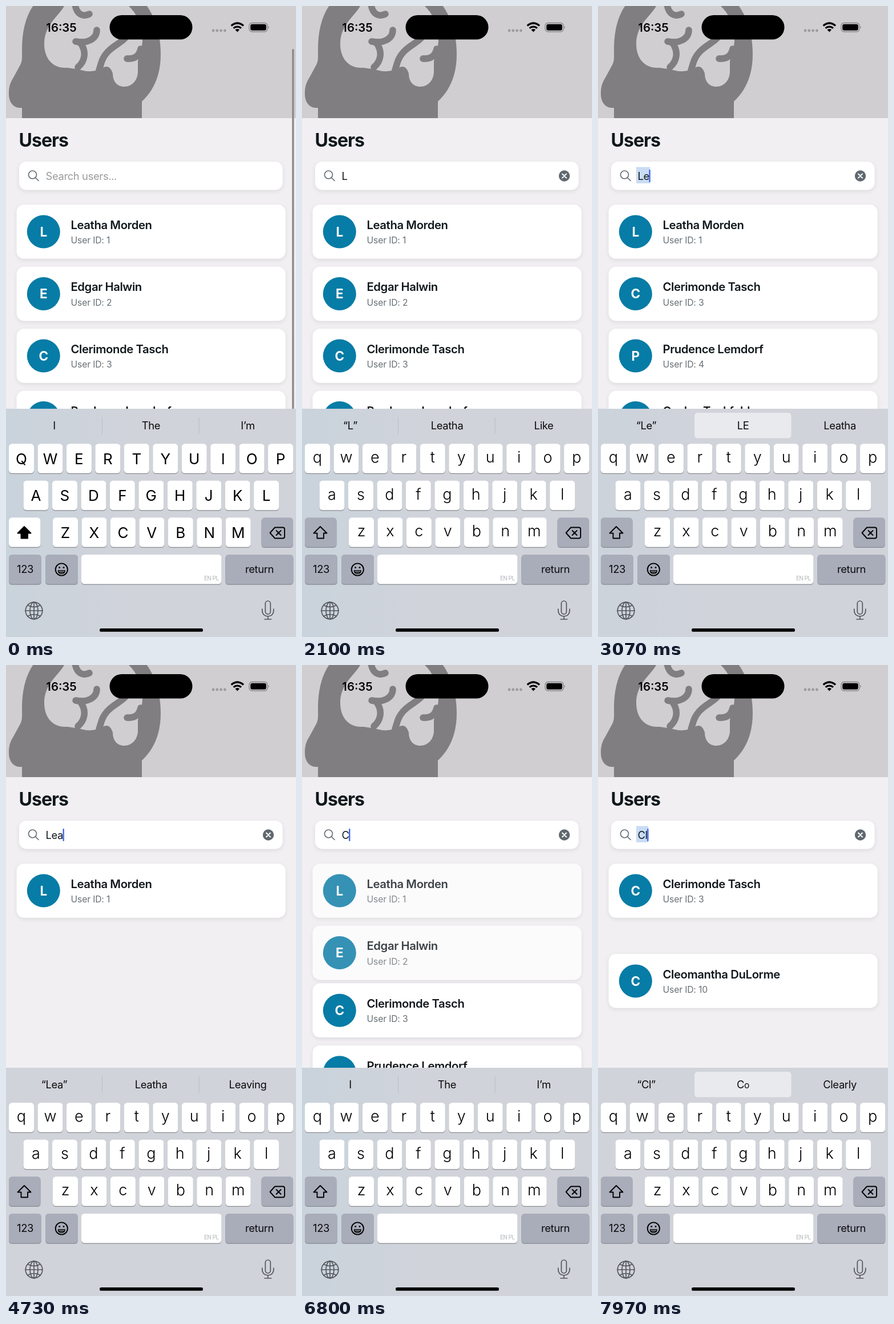
Animation, 508 px wide and 1103 px high, one loop 8 s. Source, as an HTML page:

```html
<!DOCTYPE html>
<html lang="en">
<head>
<meta charset="utf-8">
<title>User search</title>
<style>
  html, body { margin: 0; width: 100%; height: 100%; overflow: hidden; background: #f1eff2; }
  svg { display: block; width: 100vw; height: 100vh; font-family: Inter, "Liberation Sans", sans-serif; fill: #11181c; }
  .name { font-size: 20.3px; font-weight: 600; letter-spacing: -.02em; }
  .meta { font-size: 15.7px; letter-spacing: -.01em; fill: #687076; }
  .initial { font-size: 22.5px; font-weight: 700; fill: #fff; }
  .input { font-size: 18.4px; letter-spacing: -.02em; }
  .mid { text-anchor: middle; }
  .label { font-size: 18.4px; letter-spacing: -.02em; fill: #0b0b0d; }
  .upper { font-size: 26px; fill: #000; }
  .lower { font-size: 27px; font-weight: 300; fill: #000; }
  .line { fill: none; stroke-linecap: round; stroke-linejoin: round; }
</style>
</head>
<body>
<svg viewBox="0 0 508 1103" preserveAspectRatio="none">
  <defs>
    <filter id="soft" x="-5%" y="-20%" width="110%" height="150%">
      <feDropShadow dx="0" dy="2.5" stdDeviation="3.5" flood-color="#000" flood-opacity=".09"/>
    </filter>
    <linearGradient id="glow" x1="0" x2="1">
      <stop offset="0" stop-color="#c9d3dc"/>
      <stop offset=".45" stop-color="#c9d3dc" stop-opacity="0"/>
    </linearGradient>
    <clipPath id="banner"><rect width="508" height="196"/></clipPath>
  </defs>

  <rect width="508" height="1103" fill="#f1eff2"/>
  <g clip-path="url(#banner)">
    <rect width="508" height="196" fill="#d0ced1"/>
    <path fill="#807e81" d="M28 200V178C14 179 5 170 5 153C5 140 8 133 13 125L25 103C29 96 28 88 28 78C28 44 34 18 50-4H244C262 20 271 50 271 84C271 120 260 146 238 167V200Z"/>
    <path fill="#d0ced1" d="M103-3C98 14 67 30 67 66C67 92 82 108 103 108C114 108 118 110 128 111C142 116 158 115 170 108C178 103 184 108 187 118C187 132 195 141 207 141C222 141 231 128 231 115V96C234 84 240 70 239 54C238 30 228 12 212-3Z"/>
    <path class="line" stroke="#807e81" stroke-width="11.5" d="M122 62C142 66 159 58 159 42M130 64C142 80 138 97 126 107M121-2C124 14 134 20 146 14M216 42C212 66 180 66 168 96C166 102 165 106 163 112M212 92C225 93 233 88 236 75"/>
  </g>

  <text x="22.500" y="245.500" font-size="32" font-weight="700" letter-spacing="-.03em">Users</text>
  <rect x="23" y="272" width="461.5" height="49.5" rx="13" fill="#fff" filter="url(#soft)"/>
  <g class="line" stroke="#687076" stroke-width="1.7"><circle cx="46.5" cy="295" r="7"/><path d="M51.7 300.2L57 305.5"/></g>
  <rect id="selection" x="67" y="281.5" height="28.5" fill="#c9dcf3"/>
  <text id="placeholder" class="input" x="69.5" y="303.5" fill="#9b9b9e">Search users...</text>
  <text id="typed" class="input" x="69.5" y="303.5"></text>
  <rect id="caret" y="286" width="2.3" height="22" rx="1" fill="#3a63ea"/>
  <g id="clear"><circle cx="459.5" cy="297" r="9.7" fill="#606870"/><path class="line" stroke="#fff" stroke-width="1.9" d="M456 293.5l7 7m0-7l-7 7"/></g>

  <g id="list"></g>
  <rect id="scrollbar" x="501" y="75" width="3.6" height="640" rx="1.8" fill="#8f8e91"/>

  <rect y="704" width="508" height="399" fill="#d1d3da"/>
  <rect id="tint" y="704" width="508" height="399" fill="url(#glow)"/>
  <path id="dividers" stroke="#b9bcc4" d="M168.5 719V748M338 719V748"/>
  <rect id="choice" x="169" y="711" width="169.5" height="44.5" rx="5.5" fill="#e8eaee"/>
  <g id="words"></g>
  <g id="keys"></g>

  <path id="shift" class="line" stroke="#000" stroke-width="1.9" d="M32 910L43.5 921.5H38V930.5H26.5V921.5H20.5Z"/>
  <path class="line" stroke="#000" stroke-width="1.9" d="M471 911.5H485Q488 911.5 488 914.5V927.5Q488 930.5 485 930.5H471L462.5 921Z M473.5 917l8 8m0-8l-8 8"/>
  <g class="line" stroke="#000">
    <circle cx="97.3" cy="985" r="10.6" stroke-width="1.9"/>
    <path stroke-width="1.4" d="M91.3 987H103.3C102.5 994 92 994 91.3 987ZM92.5 989.700H102"/>
  </g>
  <circle cx="93.6" cy="981.5" r="1.6"/><circle cx="101" cy="981.5" r="1.6"/>
  <text class="label mid" x="33.5" y="991">123</text>
  <text class="label mid" x="444" y="991">return</text>
  <text x="347" y="1004" font-size="10.5" letter-spacing="-.05em" fill="#b7bac0" font-family="Roboto, sans-serif">EN PL</text>

  <g class="line" stroke="#55585d" stroke-width="1.7">
    <circle cx="49" cy="1057" r="14.8"/><ellipse cx="49" cy="1057" rx="7" ry="14.8"/>
    <path d="M49 1042V1072M34 1057H64M38 1047.5Q49 1053.5 60 1047.5M38 1066.5Q49 1060.5 60 1066.5"/>
    <rect x="454.3" y="1040" width="9" height="23" rx="4.5"/>
    <path d="M448.800 1054V1057C448.800 1070 468.800 1070 468.800 1057V1054M458.800 1067V1072M453 1072H464.600"/>
  </g>
  <rect x="164" y="1088" width="181" height="5.8" rx="2.9" fill="#000"/>

  <g fill="#000">
    <text class="mid" x="97" y="45.3" font-size="20.3" font-weight="600">16:35</text>
    <rect x="181.5" y="16" width="145" height="42.5" rx="21.2"/>
    <g fill="#9d9b9e"><circle cx="363" cy="43" r="2.4"/><circle cx="369.8" cy="43" r="2.4"/><circle cx="376.6" cy="43" r="2.4"/><circle cx="383.4" cy="43" r="2.4"/></g>
    <path d="M405.3 45.5L401.5 41.5Q405.3 38.5 409.1 41.5Z"/>
    <path fill="none" stroke="#000" stroke-width="3.2" d="M398.6 38.8Q405.3 33.3 412 38.8M394.6 34.5Q405.3 25.5 416 34.5"/>
    <rect x="426" y="29.5" width="32" height="15.5" rx="5" fill="none" stroke="#858386" stroke-width="1.3"/>
    <rect x="428.2" y="31.7" width="27.6" height="11.1" rx="3.2"/>
    <path fill="#858386" d="M459.6 35Q462 37.2 459.6 39.8Z"/>
  </g>
</svg>
<script>
const LOOP = 8000, PITCH = 108.5;
const people = ["Leatha Morden", "Edgar Halwin", "Clerimonde Tasch", "Prudence Lemdorf", "Candice Holbrunn",
  "Mrs. Sylvia Pechmann", "Kolman Tarrfeld", "Nathaniel Brucksdotter", "Gaylen Tuckfold", "Cleomantha DuLorme"];
const everyone = people.map((_, i) => i);
const matches = text => everyone.filter(i => people[i].toLowerCase().includes(text.toLowerCase()));

// at: keystroke time; wordsAfter: delay until new suggestions; lag: extra delay of the middle one
const step = (at, text, words, { choice = false, wordsAfter = 260, lag = 0 } = {}) => ({
  at, text, words, choice, lag, wordsAt: at + wordsAfter, listAt: at + 110,
  shown: text === "L" ? everyone : matches(text)
});
const idleWords = ["I", "The", "I’m"];
const steps = [
  step(-965, "", idleWords),
  step(1330, "L", ["“L”", "Leatha", "Like"]),
  step(2500, "Le", ["“Le”", "LE", "Leatha"], { choice: true }),
  step(3600, "Lea", ["“Lea”", "Leatha", "Leaving"]),
  step(5360, "", idleWords),
  step(6650, "C", ["“C”", "Chair", "Can"]),
  step(7624, "Cl", ["“Cl”", "Co", "Clearly"], { choice: true, wordsAfter: 150, lag: 80 })
];

const $ = id => document.getElementById(id);
const make = (tag, attrs, parent, text) => {
  const node = document.createElementNS("http://www.w3.org/2000/svg", tag);
  for (const k in attrs) node.setAttribute(k, attrs[k]);
  if (text) node.textContent = text;
  return parent.appendChild(node);
};
const set = (node, k, v) => node.setAttribute(k, v);
const show = (node, on) => set(node, "opacity", +on);
const clamp = v => Math.max(0, Math.min(1, v));
const ease = p => p < .5 ? 2 * p * p : 1 - 2 * (1 - p) ** 2;
const latest = (t, field) => steps.filter(s => s[field] <= t).pop();
const previous = s => steps[Math.max(0, steps.indexOf(s) - 1)];

const cards = people.map((name, i) => {
  const g = make("g", {}, $("list"));
  make("rect", { x: 18.7, y: 0, width: 470.8, height: 94.5, rx: 13, fill: "#fff", filter: "url(#soft)" }, g);
  make("circle", { cx: 65.8, cy: 47.3, r: 29, fill: "#077ca6" }, g);
  make("text", { class: "initial mid", x: 65.8, y: 55.6 }, g, name[0]);
  make("text", { class: "name", x: 113.5, y: 42.8 }, g, name);
  make("text", { class: "meta", x: 113.5, y: 68 }, g, "User ID: " + (i + 1));
  return g;
});

const GRAY = "#a9adba";
function addKey(x, y, width, fill) {
  const shape = { x, width, height: 51.5, rx: 5.5 };
  make("rect", { ...shape, y: y + 1.3, fill: "#888a8f" }, $("keys"));
  return make("rect", { ...shape, y, fill }, $("keys"));
}
const letters = [];
[["QWERTYUIOP", 5], ["ASDFGHJKL", 30.5], ["ZXCVBNM", 82]].forEach(([row, left], r) => {
  [...row].forEach((char, i) => {
    const x = left + i * 50.45, y = 765.3 + r * 64.5;
    addKey(x, y, 44, "#fff");
    letters.push({ char, y, node: make("text", { x: x + 22 }, $("keys")) });
  });
});
const shiftKey = addKey(5, 894.3, 55.5, GRAY);
addKey(447.5, 894.3, 55.5, GRAY);
addKey(5, 959, 57, GRAY);
addKey(69, 959, 57, GRAY);
addKey(132, 959, 245.5, "#fff");
addKey(384.3, 959, 119, GRAY);

const words = [84.5, 254, 423.5].map(x => make("text", { class: "label mid", x, y: 740 }, $("words")));

function caretOpacity(t, since) {
  let u = t - since - 670;
  if (u < 0) return 1;
  u %= 960;
  return u < 360 ? 1 - clamp(u / 100) : clamp((u - 360) / 100);
}

function drawInput(t) {
  const now = latest(t, "at"), upper = !now.text;
  $("typed").textContent = now.text;
  const width = now.text ? $("typed").getComputedTextLength() : 0;
  show($("placeholder"), upper);
  show($("clear"), !upper);
  set($("caret"), "x", 69 + width);
  show($("caret"), caretOpacity(t, now.at));
  set($("selection"), "width", width + 4);
  show($("selection"), now.choice && t >= now.wordsAt + now.lag);
  set(shiftKey, "fill", upper ? "#fff" : GRAY);
  set($("shift"), "style", "fill:" + (upper ? "#000" : "none"));
  for (const { char, y, node } of letters) {
    node.textContent = upper ? char : char.toLowerCase();
    set(node, "class", upper ? "upper mid" : "lower mid");
    set(node, "y", y + (upper ? 35.2 : 33));
  }
}

function drawWords(t) {
  const now = latest(t, "wordsAt"), before = previous(now);
  words.forEach((node, col) => {
    const start = now.wordsAt + (col === 1 ? now.lag : 0);
    const waiting = t < start;
    const word = (waiting ? before : now).words[col];
    node.textContent = "";
    [...word].forEach((char, i) => {
      const delay = word.length > 1 ? 60 * i / (word.length - 1) : 0;
      const p = waiting ? 1 : clamp((t - start - delay) / 90);
      make("tspan", { "font-size": 18.4 * (.6 + .4 * p), "fill-opacity": Math.min(1, p * 1.8) }, node, char);
    });
  });
  const choice = t < now.wordsAt + now.lag ? before.choice : now.choice;
  show($("choice"), choice);
  show($("dividers"), !choice);
}

function drawList(t) {
  const now = latest(t, "listAt"), before = previous(now);
  const age = t - now.listAt, p = ease(clamp(age / 300));
  let visible = 0;
  cards.forEach((card, i) => {
    const from = before.shown.indexOf(i), to = now.shown.indexOf(i);
    const row = from < 0 ? to : to < 0 ? from : from + (to - from) * p;
    const opacity = from < 0 ? (to < 0 ? 0 : p) : to < 0 ? 1 - clamp(age / 200) : 1;
    set(card, "transform", `translate(0 ${347.2 + row * PITCH})`);
    show(card, opacity);
    visible += opacity;
  });
  // avatars behind the translucent keyboard colour its left side
  show($("tint"), clamp((visible - 2) / 5));
  show($("scrollbar"), 1 - clamp((t - 370) / 400));
}

let origin;
function frame(time) {
  origin ??= time;
  const t = (time - origin) % LOOP;
  drawInput(t);
  drawWords(t);
  drawList(t);
  requestAnimationFrame(frame);
}
requestAnimationFrame(frame);
</script>
</body>
</html>
```
